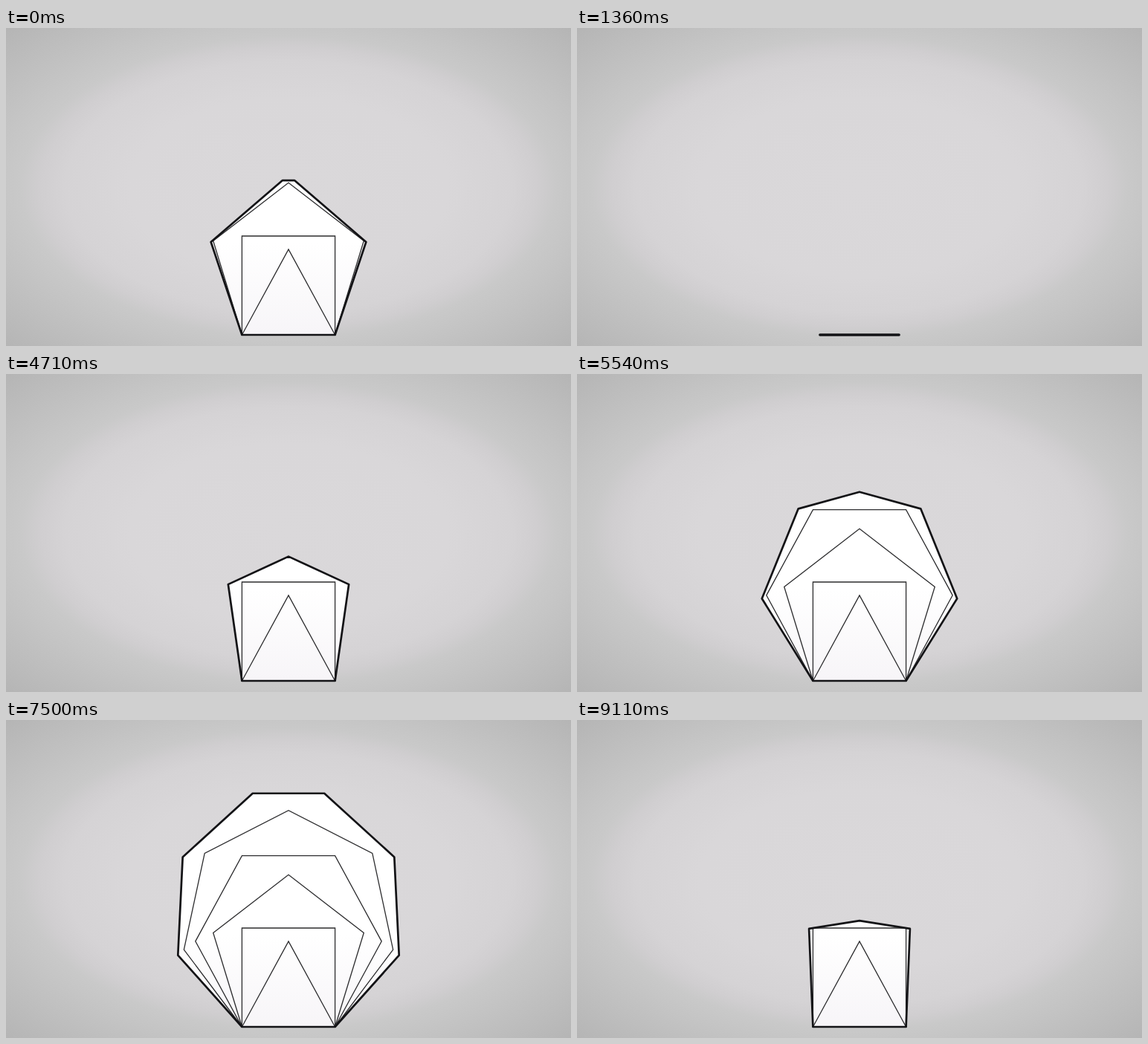
An HTML page for the animation above (9.15 s loop, 760 by 428 pixels).

```html
<!DOCTYPE html>
<html lang="en">
<head>
<meta charset="utf-8">
<title>Growing polygons</title>
<style>
  html, body { margin: 0; width: 100%; height: 100%; overflow: hidden; background: #c8c8c8; }
  svg { display: block; width: 100%; height: 100%; }
</style>
</head>
<body>
<svg viewBox="0 0 760 428">
  <defs>
    <radialGradient id="backdrop" r="0.7071">
      <stop offset="0" stop-color="#dad8da"/>
      <stop offset="0.4" stop-color="#d9d7d9"/>
      <stop offset="0.56" stop-color="#d5d3d5"/>
      <stop offset="0.62" stop-color="#d0ced0"/>
      <stop offset="0.67" stop-color="#c9c9c9"/>
      <stop offset="0.8" stop-color="#c1c1c1"/>
      <stop offset="1" stop-color="#b5b5b5"/>
    </radialGradient>
    <linearGradient id="paper" gradientUnits="userSpaceOnUse" x1="0" y1="290" x2="0" y2="413">
      <stop offset="0" stop-color="#fff"/>
      <stop offset="1" stop-color="#f7f5f8"/>
    </linearGradient>
  </defs>
  <rect width="760" height="428" fill="url(#backdrop)"/>
  <path id="body" fill="url(#paper)"/>
  <path id="inner" fill="none" stroke="#2c2c2e" stroke-width="1.3"/>
  <path id="outline" fill="none" stroke="#131316" stroke-linejoin="round" stroke-linecap="round"/>
</svg>
<script>
const LOOP = 9150;
const CX = 380, BASE = 413, SIDE_X = 125.2, SIDE_Y = 133;

// [time in ms, number of sides]
const KEYS = [
  [0, 5.13], [930, 2.87], [1360, 1.85], [1860, 1.19], [2270, 1], [2750, 1],
  [3390, 1.55], [3680, 1.95], [4430, 3.8], [5540, 6.39], [6290, 7.79],
  [6460, 7.93], [6750, 8], [7100, 8], [7490, 7.78], [8360, 5.97],
  [9110, 4.14], [LOOP, 4.04]
];

const secant = i => (KEYS[i + 1][1] - KEYS[i][1]) / (KEYS[i + 1][0] - KEYS[i][0]);

// Harmonic mean of neighbouring slopes keeps the curve monotone.
function slope(i) {
  if (i === 0) return secant(0);
  if (i === KEYS.length - 1) return secant(i - 1);
  const a = secant(i - 1), b = secant(i);
  return a * b > 0 ? 2 * a * b / (a + b) : 0;
}

function sidesAt(t) {
  let i = 0;
  while (i < KEYS.length - 2 && t >= KEYS[i + 1][0]) i++;
  const [t0, n0] = KEYS[i], [t1, n1] = KEYS[i + 1];
  const h = t1 - t0, u = (t - t0) / h, v = 1 - u;
  return n0 * v * v * (1 + 2 * u) + n1 * u * u * (3 - 2 * u)
    + h * u * v * (v * slope(i) - u * slope(i + 1));
}

// Regular polygon on a shared base, listed from base right to base left.
function polygon(k) {
  if (k === 1) return [[CX, BASE]];
  const r = 0.5 / Math.sin(Math.PI / k);
  return Array.from({ length: k }, (_, i) => {
    const a = Math.PI * (2 * i + 1) / k;
    return [
      CX + SIDE_X * r * Math.sin(a),
      BASE - SIDE_Y * r * (Math.cos(Math.PI / k) - Math.cos(a))
    ];
  });
}

const mix = (p, q, f) => [p[0] + (q[0] - p[0]) * f, p[1] + (q[1] - p[1]) * f];

// An odd shape splits its apex; an even one gains a vertex on its top edge.
function morph(n) {
  const k = Math.floor(n), f = n - k, from = polygon(k);
  if (f === 0) return from;
  const m = k >> 1;
  from.splice(m, 0, k % 2 ? from[m] : mix(from[m - 1], from[m], 0.5));
  return polygon(k + 1).map((q, i) => mix(from[i], q, f));
}

const toPath = pts => "M" + pts.map(p => p[0].toFixed(2) + " " + p[1].toFixed(2)).join("L") + "Z";
const [body, inner, outline] = ["body", "inner", "outline"].map(id => document.getElementById(id));

function draw(t) {
  const n = Math.min(8, Math.max(1, sidesAt(t)));
  const shape = toPath(morph(n));
  let lines = "";
  for (let k = 3; k <= n; k++) lines += toPath(polygon(k));
  body.setAttribute("d", shape);
  inner.setAttribute("d", lines);
  outline.setAttribute("d", shape);
  outline.setAttribute("stroke-width", n < 2 ? 3.6 : 2.7);
}

function tick() {
  draw(performance.now() % LOOP);
  requestAnimationFrame(tick);
}
tick();
</script>
</body>
</html>
```
